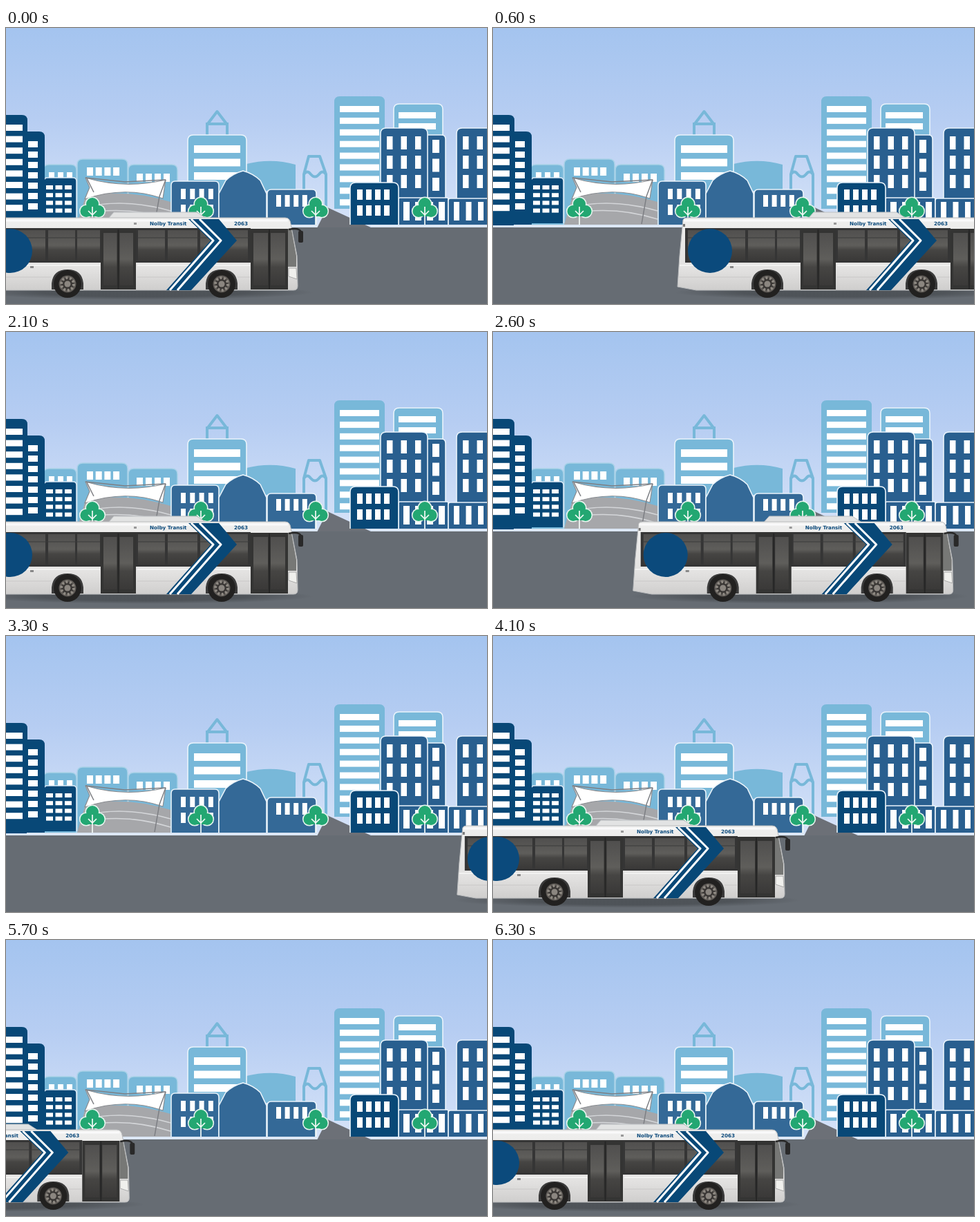
An HTML page for the animation above (6.4 s loop, 696x400 px).

```html
<!DOCTYPE html>
<html lang="en">
<head>
<meta charset="utf-8">
<title>City bus</title>
<style>
  html, body { margin: 0; width: 100%; height: 100%; overflow: hidden; }
  svg { display: block; width: 696px; height: 400px; }
  text { font: bold 7.2px "DejaVu Sans", sans-serif; fill: #0b4a7c; }
</style>
</head>
<body>
<svg viewBox="0 0 696 400">
  <defs>
    <linearGradient id="sky" x2="0" y2="1">
      <stop offset="0" stop-color="#a4c4ef"/>
      <stop offset=".45" stop-color="#b6cdf2"/>
      <stop offset="1" stop-color="#d6e3f8"/>
    </linearGradient>
    <linearGradient id="side" x2="0" y2="1">
      <stop offset="0" stop-color="#efefee"/>
      <stop offset=".7" stop-color="#e3e2e1"/>
      <stop offset="1" stop-color="#cfcecd"/>
    </linearGradient>
    <linearGradient id="glass" x2="0" y2="1">
      <stop offset="0" stop-color="#504f4e"/>
      <stop offset=".5" stop-color="#5f5e5b"/>
      <stop offset=".65" stop-color="#464543"/>
      <stop offset="1" stop-color="#3a3938"/>
    </linearGradient>
    <radialGradient id="shade">
      <stop offset=".6" stop-color="#3f4347" stop-opacity=".6"/>
      <stop offset="1" stop-color="#3f4347" stop-opacity="0"/>
    </radialGradient>
  </defs>
  <g id="city"></g>
  <g id="bus"></g>
</svg>
<script>
const NAVY = '#084877', MID = '#295f8f', STEEL = '#346997', LIGHT = '#78b8d9';
const PALE = '#a9d2e8', EDGE = '#eaf4fb';

const rect = (x, y, w, h, fill, more = '') =>
  `<rect x="${x}" y="${y}" width="${w}" height="${h}" fill="${fill}" ${more}/>`;
const path = (d, fill, stroke = 'none', width = 1) =>
  `<path d="${d}" fill="${fill}" stroke="${stroke}" stroke-width="${width}" stroke-linejoin="round"/>`;
const line = (d, stroke, width) => path(d, 'none', stroke, width);
const disc = (x, y, r, fill) => `<circle cx="${x}" cy="${y}" r="${r}" fill="${fill}"/>`;

// Block with rounded top corners, reaching down to y = bottom
function block(x, y, w, bottom, fill, edge = 'none', r = 8) {
  return path(`M${x} ${bottom}V${y + r}q0 ${-r} ${r} ${-r}h${w - 2 * r}q${r} 0 ${r} ${r}V${bottom}`,
    fill, edge, 1.6);
}

// Regular grid of white windows
function panes(x, y, w, h, cols, rows, dx, dy) {
  let out = '';
  for (let r = 0; r < rows; r++)
    for (let c = 0; c < cols; c++)
      out += rect(x + c * dx, y + r * dy, w, h, '#fff');
  return out;
}

const office = x => block(x, 145, 68, 285, MID, EDGE) + panes(x + 9, 157, 8.5, 19, 3, 3, 20.5, 28);

function tree(x) {
  const leaves = (grow, fill) =>
    disc(x, 255, 9 + grow, fill) + disc(x - 9, 265.5, 8.5 + grow, fill) + disc(x + 9, 265.5, 8.5 + grow, fill);
  return leaves(1.6, '#e6f5ee') + leaves(0, '#23a772') + rect(x - 5, 261, 10, 12, '#23a772') +
    line(`M${x} 259V285M${x - 6} 265L${x} 271L${x + 6} 265`, '#f2faf6', 1.7);
}

function pavilion() {
  return path('M102 288L115 244Q172 232 238 252V288z', '#a6a7aa') +
    line('M112 260Q172 246 238 265M108 270Q172 256 238 277', '#d4d6d9', 1.5) +
    path('M115 217Q172 234 231 220L227 247Q172 228 114 248L121 231z', '#fff', '#8a8c90', 1.2) +
    line('M115 217L172 223L231 220M117 218L127 238M231 220L222 244L215 284', '#7d7f84', 1.5);
}

function drawCity() {
  return rect(0, 0, 696, 290, 'url(#sky)') +
    block(54, 198, 48, 285, LIGHT, PALE) + panes(62, 209, 8, 10, 3, 1, 13, 0) +
    block(103, 190, 73, 285, LIGHT, PALE) + panes(117, 202, 9, 12, 4, 1, 12.7, 0) +
    block(177, 198, 71, 285, LIGHT, PALE) + panes(189, 211, 9, 12, 4, 1, 13, 0) +
    path('M348 236V197Q384 188 419 198V236z', LIGHT) +
    line('M291 156V140L305.5 121L320 140V156M289 139H322', LIGHT, 4) +
    block(263, 155, 85, 285, LIGHT, EDGE) + panes(272, 170, 67, 11, 1, 3, 0, 19.5) +
    line('M431 260V212L438 186H454L463 212V260M431 212Q436 205 441 212Q447 219 453 212Q458 205 463 212', LIGHT, 4) +
    block(475, 99, 73, 262, LIGHT) + panes(483, 113, 57, 9, 1, 9, 0, 16.9) +
    block(561, 110, 71, 200, LIGHT, EDGE) + panes(568, 122, 54, 9, 1, 2, 0, 16) +
    pavilion() +
    block(55, 217, 47, 283, NAVY, '#dbe9f6', 5) + panes(58, 228, 10, 6, 3, 4, 13.5, 11.2) +
    block(20, 150, 36, 286, NAVY) + panes(32, 164, 14, 9, 1, 7, 0, 15) +
    block(-20, 126, 51, 286, NAVY) + panes(-2, 140, 26, 9, 1, 8, 0, 16.6) +
    block(239, 222, 69, 285, STEEL, EDGE, 6) + panes(253, 233, 7, 15, 4, 2, 13.3, 23) +
    block(378, 234, 71, 285, STEEL, EDGE, 6) + panes(391, 242, 7, 17, 4, 1, 12.6, 0) +
    path('M308 285V240L318 221Q328 211 343 207Q358 211 368 221L377 240V285', STEEL, EDGE, 1.6) +
    block(600, 155, 36, 250, MID, EDGE, 6) + panes(617, 162, 10, 19, 1, 3, 0, 27.5) +
    office(542) + office(652) +
    block(568, 246, 72, 285, MID, EDGE, 2) + panes(575, 252, 9, 27, 4, 1, 17, 0) +
    block(640, 247, 70, 285, MID, EDGE, 3) + panes(648, 252, 8, 27, 3, 1, 17.5, 0) +
    rect(30, 285, 425, 5, '#dce7f5') + rect(528, 285, 168, 5, '#dce7f5') +
    path('M450 290L465 260L530 290z', '#6c7077') +
    block(498, 224, 70, 285, NAVY, EDGE) + panes(508, 234, 8, 15, 4, 2, 13, 23) +
    rect(0, 289, 696, 111, '#666c73') +
    [125, 282, 448, 606].map(tree).join('');
}

function door(x, w) {
  const half = w / 2;
  return rect(x, 291, w, 88, '#343433') +
    [x + 4, x + half + 2].map(p => rect(p, 297, half - 6, 76, 'url(#glass)')).join('') +
    line(`M${x + half} 292V378`, '#262626', 2);
}

function wheel(x) {
  return path(`M${x - 23} 379V370Q${x - 21} 350 ${x} 350Q${x + 21} 350 ${x + 23} 370V379z`, '#3b3b3b') +
    disc(x, 371, 20, '#222120') + disc(x, 371, 12.5, '#5d5955') +
    `<circle cx="${x}" cy="371" r="9" fill="#3a3735" stroke="#8f8a83" stroke-width="4" stroke-dasharray="3 2.65"/>` +
    disc(x, 371, 4.5, '#8b8680');
}

function drawBus() {
  return '<ellipse cx="200" cy="383" rx="245" ry="11" fill="url(#shade)"/>' +
    path('M148 276L156 267H276L290 276z', '#e2e3e3', '#bcbfc2', 1) +
    path('M-33 278Q-32 275 -27 275H404Q411 275 412 284L421 330L422 374Q422 380 416 380H-14L-41 375L-38 330z',
      'url(#side)', '#b9bbbd', 1) +
    line('M-32 279H408', '#fafafa', 3) +
    rect(-30, 290, 384, 50, '#353535') +
    [[-26, 83], [61, 39], [103, 33], [191, 39], [234, 43], [281, 69]]
      .map(([x, w]) => rect(x, 293, w, 44, 'url(#glass)')).join('') +
    line('M-26 304H136M190 304H352', '#3b3b3a', 1.2) +
    line('M-38 344H136M190 344H353', '#f2f2f1', 2) +
    line('M-39 361H65M190 361H290M335 361H353', '#c9c8c7', 1) +
    door(137, 51) + door(354, 54) +
    path('M408 291L413 292L420 330L420 346H408z', '#777876') +
    path('M409 348H420L421 364L409 360z', '#f0f0ed', '#aaa', 1) +
    path('M264 277H308L334 308L268 380H232L296 308z', NAVY) +
    line('M268 277L300 308L237 380M280 277L311 308L248 380', '#fff', 3) +
    wheel(89) + wheel(312) +
    disc(6, 323, 32, '#0b4a7c') +
    line('M409 292Q425 289 427 296', '#292929', 2.5) +
    rect(423, 294, 7, 17, '#292929', 'rx="2"') +
    rect(-33, 284, 3, 4, '#777') + rect(35, 345, 5, 3, '#888') + rect(185, 282, 4, 3, '#999') +
    '<text x="208" y="285.5">Nolby Transit</text><text x="330" y="285.5">2063</text>';
}

const bus = document.getElementById('bus');
document.getElementById('city').innerHTML = drawCity();
bus.innerHTML = drawBus();

const LOOP = 6400, LAP = 2100, TICK = 100, TRAVEL = 2000, WRAP = 1250;
const SPEED = 0.643, RAMP = 242;

// Distance covered after pulling away: short ramp, then steady speed
const run = t => t < RAMP ? SPEED * t * t / (2 * RAMP) : SPEED * (t - RAMP / 2);

// Leaves to the right, then comes in from the left and stops in the same way
const offset = t => t < WRAP ? run(t) : -run(Math.max(0, TRAVEL - t));

const start = performance.now();
function frame() {
  const time = (performance.now() - start) % LOOP;
  const lap = Math.floor(time / TICK) * TICK % LAP;
  bus.setAttribute('transform', `translate(${offset(lap).toFixed(1)} 0)`);
  requestAnimationFrame(frame);
}
frame();
</script>
</body>
</html>
```
